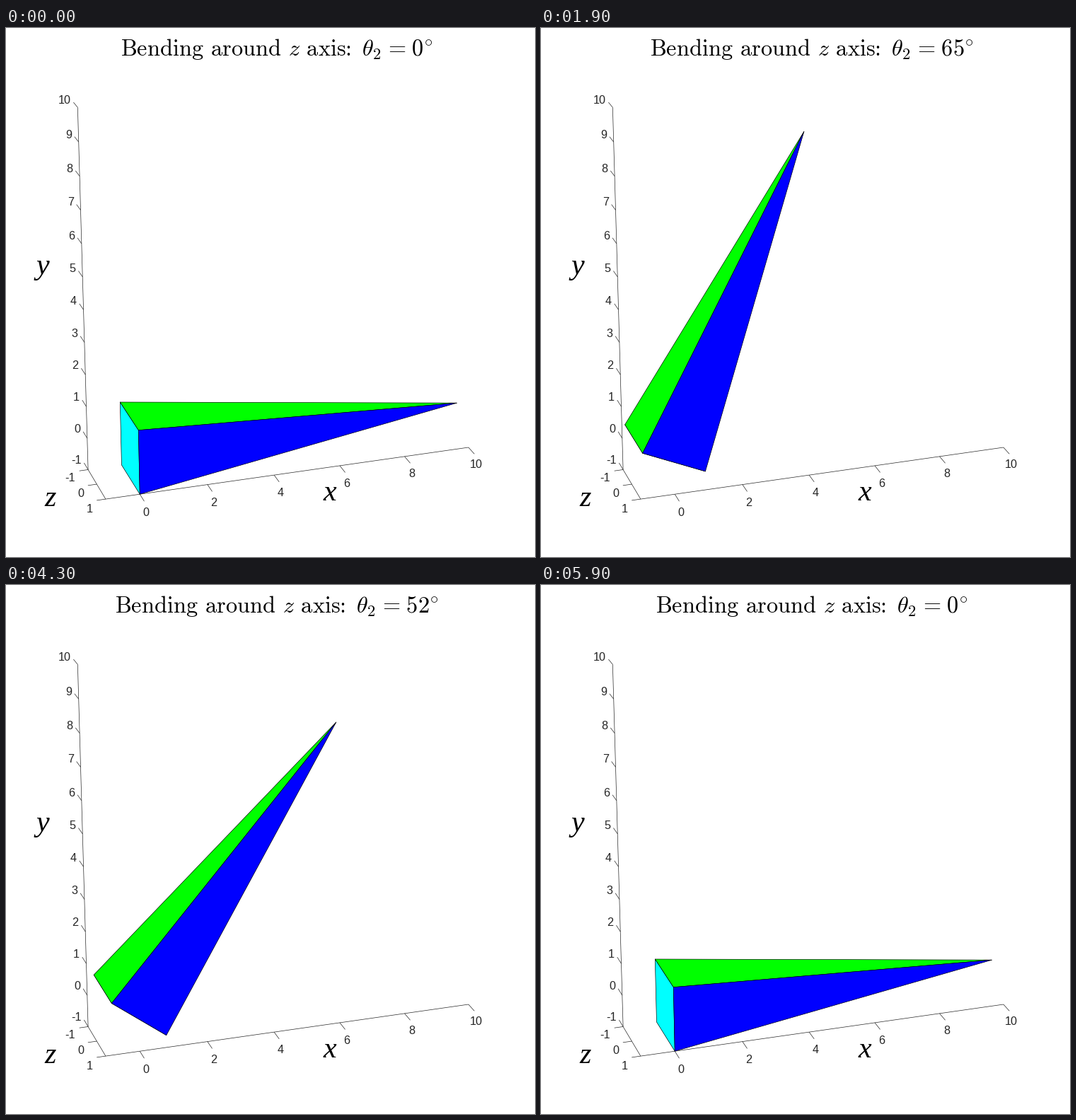
A matplotlib script that plays this animation: 748x748 px, repeating every 6000 ms.

```python
import numpy as np
import matplotlib.pyplot as plt
from matplotlib.animation import FuncAnimation
from matplotlib.patches import Polygon

SIZE, DPI = 748, 68
FRAMES, INTERVAL = 60, 100
INK = "#262626"
plt.rcParams["mathtext.fontset"] = "cm"
plt.rcParams["font.family"] = "Liberation Sans"

# Perspective camera looking at the middle of the plot box.
AZIMUTH, ELEVATION = np.radians([18, 22])
TARGET = np.array([4.5, 4.5, 0])
DISTANCE = 5 * np.linalg.norm([11, 11, 2])
SCALE = 49.81
CENTER = np.array([387.3, 361.1])

SIN_A, COS_A = np.sin(AZIMUTH), np.cos(AZIMUTH)
SIN_E, COS_E = np.sin(ELEVATION), np.cos(ELEVATION)
RIGHT = np.array([COS_A, 0, SIN_A])
DOWN = np.array([-SIN_A * SIN_E, -COS_E, COS_A * SIN_E])
NEAR = np.array([-SIN_A * COS_E, SIN_E, COS_A * COS_E])


def project(points):
    d = np.atleast_2d(np.asarray(points, float)) - TARGET
    depth = 1 - d @ NEAR / DISTANCE
    flat = np.c_[d @ RIGHT, d @ DOWN]
    return CENTER + SCALE * flat / depth[:, None]


fig = plt.figure(figsize=(SIZE / DPI, SIZE / DPI), dpi=DPI, facecolor="white")
ax = fig.add_axes([0, 0, 1, 1])
ax.set_xlim(0, SIZE)
ax.set_ylim(SIZE, 0)
ax.axis("off")


def pt(px):
    return px * 72 / DPI


def write(x, y, s, px, color="black", ha="center", **style):
    return ax.text(x, y, s, fontsize=pt(px), color=color, ha=ha,
                   va="baseline", **style)


def line(points):
    u, v = project(points).T
    ax.plot(u, v, color=INK, lw=pt(0.7), solid_capstyle="butt", zorder=1)


def tick(start, end, label, dx, dy, ha="center"):
    line([start, end])
    u, v = project(start)[0]
    write(u + dx, v + dy + 5.7, label, 16.3, INK, ha)


def axis_name(x, y, s):
    write(x, y, s, 42, family="Liberation Serif", style="italic")


def draw_axes():
    line([(-1, 10, -1), (-1, -1, -1), (-1, -1, 1), (10, -1, 1)])
    for y in range(-1, 11):
        tick((-1, y, -1), (-1, y, -1.47), str(y),
             -9.6, -14.2 + 0.36 * y, "right")
    for x in range(0, 11, 2):
        tick((x, -1, 1), (x, -1, 1.47), str(x), 8.3 + 0.27 * x, 25 - 0.15 * x)
    for z in (-1, 0, 1):
        tick((-1, -1, z), (-1.26, -1, z), str(z), -18, 12 + 0.7 * z, "right")
    axis_name(457.5, 667.5, "x")
    axis_name(52, 347.5, "y")
    axis_name(63, 675.5, "z")


# Wedge: a square base on x = 0 and a tip on the x axis.
BODY = np.array([(0, -1, 1), (0, 1, 1), (0, 1, -1), (0, -1, -1), (10, 0, 0)])
FACES = (((0, 1, 2, 3), "cyan"), ((1, 2, 4), "lime"), ((0, 1, 4), "blue"))

draw_axes()
title = write(383.2, 39.3, "", 32.4)
patches = [
    ax.add_patch(Polygon(np.zeros((len(ids), 2)), closed=True, fc=color,
                         ec="black", lw=pt(0.65), joinstyle="round", zorder=2 + i))
    for i, (ids, color) in enumerate(FACES)
]


def bend_angle(frame):
    """Smoothstep from 0 to 90 degrees, then the same way back."""
    t = min(frame, FRAMES - 1 - frame) / (FRAMES // 2 - 1)
    return 90 * t * t * (3 - 2 * t)


def title_text(angle):
    gap = r"\hspace{0.38}"
    return (r"$\mathrm{Bending}" + gap + r"\mathrm{around}" + gap + "z" + gap
            + r"\mathrm{axis}\hspace{-0.2}:\hspace{0.3}"
            + r"\theta_2\hspace{0.1}=\hspace{0.1}"
            + rf"{angle:.0f}^{{\circ}}$")


def update(frame):
    angle = bend_angle(frame)
    a = np.radians(angle)
    c, s = np.cos(a), np.sin(a)
    turn = np.array([(c, -s, 0), (s, c, 0), (0, 0, 1)])
    flat = project(BODY @ turn.T)
    for patch, (ids, _) in zip(patches, FACES):
        patch.set_xy(flat[list(ids)])
    title.set_text(title_text(angle))
    return patches + [title]


anim = FuncAnimation(fig, update, frames=FRAMES, interval=INTERVAL,
                     repeat=True, repeat_delay=0, blit=False)
plt.show()
```
